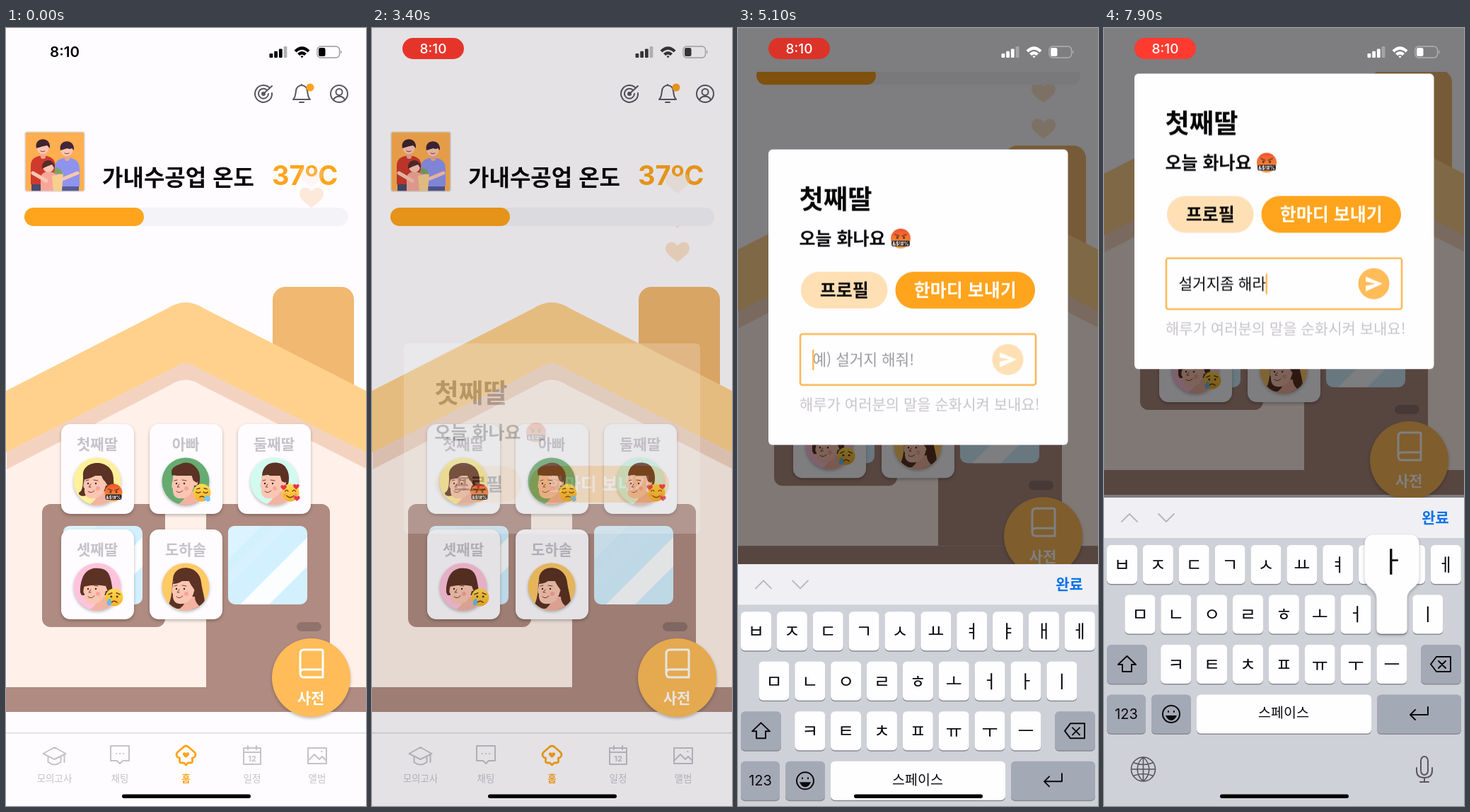
An HTML page for the animation above (8 s loop, 509 by 1100 pixels).

```html
<!DOCTYPE html>
<html lang="ko">
<head>
<meta charset="utf-8">
<style>
html, body { margin: 0; width: 100%; height: 100%; overflow: hidden; background: #fefcff; }
svg { display: block; width: 100vw; height: 100vh; }
text { font-family: "Noto Sans CJK KR", "Noto Sans CJK", "Noto Sans KR", sans-serif; white-space: pre; }
.num { font-family: Inter, Roboto, sans-serif; }
.line { fill: none; stroke-width: 2; stroke-linecap: round; stroke-linejoin: round; }
.card { filter: drop-shadow(0 2px 2px #0004); }

.pill, .clock, .rec, .pilltime, .dim, .modal, .status, .page, .keys, .box, .lead, .entry {
  animation: 8s linear infinite;
}
.pill { animation-name: show-pill; }
.clock { animation-name: hide-clock; }
.rec { animation-name: hide-rec; }
.pilltime { animation-name: show-time; }
.dim { animation-name: dim; }
.modal { animation-name: dim, place; }
.status { animation-name: tint; }
.page { animation-name: scroll; }
.keys { animation-name: raise; }
.box { animation-name: grow; }
.lead { animation-name: nudge; }
.entry { animation-name: reveal; }

@keyframes show-pill { 0%, 3.75% { opacity: 0 } 7.5%, 100% { opacity: 1 } }
@keyframes hide-clock { 0%, 3.75% { opacity: 1 } 7.5%, 100% { opacity: 0 } }
@keyframes hide-rec { 0%, 37.5% { opacity: 1 } 42.5%, 100% { opacity: 0 } }
@keyframes show-time { 0%, 37.5% { opacity: 0 } 42.5%, 100% { opacity: 1 } }
@keyframes dim { 0%, 41.875% { opacity: 0 } 45%, 100% { opacity: 1 } }
@keyframes tint { 0%, 41.875% { color: #000 } 45%, 100% { color: #fff } }
@keyframes place {
  0%, 53.125% { transform: translateY(446px); animation-timing-function: ease-out }
  56.25%, 61.16% { transform: translateY(371.5px); animation-timing-function: cubic-bezier(.5, 1, .89, 1) }
  67.5%, 100% { transform: translateY(64.5px) }
}
@keyframes grow {
  0%, 53.125% { x: 45px; width: 419px; height: 269px; animation-timing-function: ease-out }
  56.25%, 100% { x: 43px; width: 423.5px; height: 418px }
}
@keyframes nudge { 0%, 53.125% { transform: none } 56.25%, 100% { transform: translateX(-2px) } }
@keyframes reveal { 0%, 53.8% { opacity: 0 } 56.25%, 100% { opacity: 1 } }
@keyframes scroll {
  0%, 61.16% { transform: none; animation-timing-function: cubic-bezier(.5, 1, .89, 1) }
  67.5%, 100% { transform: translateY(-307px) }
}
@keyframes raise {
  0%, 61.25% { transform: translateY(436px); animation-timing-function: cubic-bezier(.33, 1, .68, 1) }
  67.5%, 100% { transform: none }
}
</style>
</head>
<body>
<svg id="stage" viewBox="0 0 509 1100" preserveAspectRatio="none"></svg>
<script>
const ORANGE = '#ffa41c', AMBER = '#ffbc58', BROWN = '#b08b81', HAIR = '#5b3224', SKIN = '#fac6b2', GREY = '#c5c2c8', INK = '#5b5660';

const rect = (x, y, w, h, r, fill, more = '') =>
  `<rect x="${x}" y="${y}" width="${w}" height="${h}" rx="${r}" fill="${fill}" ${more}/>`;
const circle = (x, y, r, fill, more = '') => `<circle cx="${x}" cy="${y}" r="${r}" fill="${fill}" ${more}/>`;
const path = (d, fill, more = '') => `<path d="${d}" fill="${fill}" ${more}/>`;
const line = (d, color, more = '') => `<path class="line" d="${d}" stroke="${color}" ${more}/>`;
const at = (x, y, body, more = '') => `<g transform="translate(${x} ${y})" ${more}>${body}</g>`;
// Text placed by its vertical centre
const text = (str, x, cy, size, fill, weight = 400, anchor = 'middle', more = '') =>
  `<text x="${x}" y="${cy + size * .37}" font-size="${size}" fill="${fill}" font-weight="${weight}" text-anchor="${anchor}" ${more}>${str}</text>`;

const HEART = 'M0 14C-3 11-17 3-17-5-17-16-5-17 0-9 5-17 17-16 17-5 17 3 3 11 0 14Z';

function emoji(kind, x, y, r) {
  const eyes = circle(-4, -1, 1.4, '#5a3211') + circle(4, -1, 1.4, '#5a3211');
  const thin = (d, c = '#6b3d10') => line(d, c, 'style="stroke-width:1.3"');
  const small = (hx, hy) => path(HEART, '#f0304a', `transform="translate(${hx} ${hy}) scale(.24)"`);
  const looks = {
    angry: eyes + thin('M-7-5L-2-3M7-5L2-3') + rect(-11, 2.5, 22, 7, 2, '#2b2024')
      + '<text class="num" y="8.2" font-size="6" font-weight="700" fill="#fff" text-anchor="middle">&amp;$!#%</text>',
    sleepy: thin('M-8-1Q-5 2-2-1M2-1Q5 2 8-1M-7-5L-3-6M7-5L3-6M-3 6Q0 4 3 6')
      + path('M5 5C8 2 12 5 11 8 13 11 8 14 6 11 2 11 2 7 5 5Z', '#7cc8f5'),
    loved: thin('M-7-2Q-5-5-3-2M3-2Q5-5 7-2M-5 4Q0 9 5 4') + circle(-7, 3, 2, '#ff9a6b') + circle(7, 3, 2, '#ff9a6b')
      + small(-9, -7) + small(8, -8) + small(9, 8),
    sad: eyes + thin('M-8-4L-3-6M8-4L3-6M-4 7Q0 3 4 7') + path('M-6 1C-2 6-4 11-7 11-11 11-11 6-6 1Z', '#62bdf5')
  };
  return `<g transform="translate(${x} ${y}) scale(${r / 12})">`
    + circle(0, 0, 12, kind === 'angry' ? 'url(#rage)' : 'url(#glad)') + looks[kind] + '</g>';
}

const BACK = {
  bob: 'M-20-8C-22-32 24-34 23-2 23 8 30 20 22 24L-16 20C-20 22-27 20-26 16-20 14-20 2-20-8Z',
  bun: 'M18-30a8.500 8.500 0 1 1 .1 0ZM-12-14C-8-30 22-30 21-4 21 8 15 12 10 10Z',
  short: 'M-18-10C-20-28 18-32 20-8 21 2 18 9 14 10L8 0Z',
  fringe: 'M-24 8C-26-32 17-34 20-6 22 4 22 8 19 12L-22 12Z',
  long: 'M-18-10C-18-34 20-32 22-6 24 10 32 26 22 33L-27 30C-18 18-20 0-18-10Z'
};
const FRONT = {
  bob: 'M-20-2C-20-20-8-27 2-25 20-25 22-8 17 10L11 0C6-4 6-10 4-14-2-6-12-4-20-2Z',
  bun: 'M-17-8C-16-24-4-28 6-26 20-24 22-8 16 2L11 0C9-6 9-8 7-13 0-9-10-9-17-8Z',
  short: 'M-19-8C-24-22-8-23-4-26 14-30 22-12 16 2L11-1C9-6 9-8 7-13 0-8-10-12-19-8Z',
  fringe: 'M-23 1C-23-22-8-28 2-26 20-26 22-6 17 12L12-1C0-3-10-3-23 1Z',
  long: 'M-18-4C-16-22-6-28 4-26 22-24 24-2 18 18L11 2C6-4 4-10 2-14-4-8-10-4-18-4Z'
};
const avatar = (x, y, bg, style) => at(x, y, circle(0, 0, 33.5, bg, 'class="card"') + '<g clip-path="url(#disc)">'
  + path(BACK[style], HAIR)
  + path('M0 14H13C13 24 20 27 27 34H-14C-6 30 0 26 0 14Z', '#f3b3a1')
  + path('M-18-8C-17 0-22 7-18 10-19 22-12 25-5 24 6 24 14 12 13-8Z', SKIN)
  + circle(13, 2, 4, SKIN) + path(FRONT[style], HAIR)
  + circle(-13, 3, 1.2, '#3a211b') + circle(-2, 3, 1.2, '#3a211b') + circle(1, 10, 3, '#f7a599')
  + line('M-16-1L-12-2M-5-2L1-1M-13 14Q-9 18-4 13M-9 4L-12 8H-9', '#7a3a30', 'style="stroke-width:1"') + '</g>');

const card = (x, y, name, bg, style, mood, dx = 23, dy = 16) =>
  rect(x, y, 103, 127, 13, '#fefcff', 'class="card"') + text(name, x + 51, y + 28, 21, GREY, 700)
  + avatar(x + 51, y + 81, bg, style) + (mood ? emoji(mood, x + 51 + dx, y + 81 + dy, 12.5) : '');

const glass = x => at(x, 704, rect(0, 0, 112, 111, 10, '#d3f0ff')
  + path('M0 48 48 0H10Q0 0 0 10Z', '#dcf4ff') + path('M17 111 112 16V57L58 111Z', '#fbfdff')
  + path('M0 84 84 0H66L0 66Z', '#dcf4ff', 'opacity=".5"'));

const house = rect(377, 366, 115, 210, 18, '#f0b870')
  + path('M1 620 254 480 509 620V932H1Z', '#fff1e9')
  + path('M1 560 254 440 509 560V623L276 505Q254 490 232 505L1 624Z', '#f3d3c0')
  + path('M0 513 229 396Q254 380 279 396L509 513V600L272 481Q254 467 236 481L0 600Z', '#ffd18d')
  + rect(51, 673, 174, 174, 12, BROWN) + path('M283 932V685a12 12 0 0 1 12-12H446a12 12 0 0 1 12 12V932Z', BROWN)
  + glass(81) + glass(314) + rect(411, 840, 35, 13, 6.5, '#8f736c') + rect(0, 932, 509, 35.5, 0, BROWN);

const cards = card(78, 560, '첫째딸', '#fff09a', 'bob', 'angry') + card(203, 560, '아빠', '#66ab70', 'short', 'sleepy')
  + card(328, 560, '둘째딸', '#d2fbef', 'bun', 'loved') + card(78, 709, '셋째딸', '#ffc3dc', 'fringe', 'sad', 24, 15)
  + card(203, 709, '도하솔', '#ffca66', 'long');

const person = (x, y, shirt, hair) => at(x, y, path('M-17 52V26Q-17 14-5 12H6Q17 14 18 26V52Z', shirt)
  + rect(-3, 6, 7, 10, 3, '#f0a592') + circle(0, 1, 8.5, SKIN) + path('M-9 1C-13-15 12-17 10 1L6-3Q0-2-9 1Z', hair)
  + line('M-3 5Q0 7 3 5', '#8a3b30', 'style="stroke-width:1"'));
const family = at(27, 147, '<g clip-path="url(#photo)">' + rect(0, 0, 84, 84, 3, '#ffae50')
  + person(25, 22, '#cf3a2c', '#3f2530') + person(59, 25, '#8d93ee', '#43263a') + circle(63, 20, 4, '#43263a')
  + path('M9 74H44V84H9Z', '#4a4a6a') + path('M46 77H76V84H46Z', '#575a96')
  + path('M22 84V64Q24 56 33 56 44 56 46 66V84Z', '#f7a79a') + circle(33, 49, 8, SKIN)
  + path('M24 52C22 36 43 36 42 52L38 46Q32 48 24 52Z', '#552b2b')
  + path('M38 62 54 58 52 84H40Z', '#f8cf8c') + path('M40 58 44 50 50 53 54 60Z', '#7fa35b')
  + line('M11 58 30 69M74 58 52 67', SKIN, 'style="stroke-width:5"') + '</g>'
  + rect(0, 0, 84, 84, 3, 'none', 'stroke="#ddd9dc" stroke-width="1.5"'));

const header = at(364, 93, line('M9-8A12 12 0 1 0 12-1M4-6A7 7 0 1 0 7 0M0 0 12-11M0-2A2 2 0 1 0 2 0', INK))
  + at(418, 93, line('M-12 8C-8 4-9 0-8-4A8 8 0 0 1 8-4C9 0 8 4 12 8ZM-3 12H3M0-12V-13', INK)) + circle(430, 84, 5.5, ORANGE)
  + at(471, 93, line('M-12 0a12 12 0 1 0 24 0a12 12 0 1 0-24 0M-4.5-2.5a4.5 4.5 0 1 0 9 0a4.5 4.5 0 1 0-9 0M-8 9C-6 2 6 2 8 9', INK))
  + family + text('가내수공업 온도', 136, 211, 32, '#0b090b', 700, 'start')
  + '<text class="num" x="376" y="222" font-size="38" font-weight="700" fill="#ffa41c">37ºC</text>';

const fab = circle(431.5, 918.5, 55.5, AMBER, 'class="card"')
  + line('M421 879H446Q448 879 448 881V918H421Q416 918 416 912V885Q416 879 421 879ZM416 912Q416 907 421 907H448', '#fff', 'style="stroke-width:3"')
  + text('사전', 431, 947, 21, '#fff', 700);

const tab = (x, name, icon, color = GREY, weight = 400, stroke = 2) =>
  at(x, 1028, line(icon, color, `style="stroke-width:${stroke}"`)) + text(name, x, 1061, 13.5, color, weight);
const nav = rect(0, 967, 509, 440, 0, '#fefcff') + rect(0, 996, 509, 1.5, 0, '#dcdadf')
  + tab(68.5, '모의고사', 'M-16-2 0-11 16-2 0 6ZM-9 3V10Q0 17 9 10V3M14 0V10')
  + tab(161, '채팅', 'M-13-13H13V8H4L0 12-4 8H-13ZM-5-2H-4.8M0-2H.2M5-2H5.2')
  + tab(254.5, '홈', 'M0-13Q2-13 4-11L12-4Q15-1 12 3L9 4V9Q9 11 6 11H3L0 14-3 11H-6Q-9 11-9 9V4L-12 3Q-15-1-12-4L-4-11Q-2-13 0-13Z', ORANGE, 700, 2.8)
  + path(HEART, ORANGE, 'transform="translate(254.5 1028) scale(.27)"')
  + tab(348, '일정', 'M-12-10H12V13H-12ZM-12-4H12M-6-13V-8M6-13V-8')
  + `<text class="num" x="348" y="1037" font-size="11" font-weight="700" fill="${GREY}" text-anchor="middle">12</text>`
  + tab(440, '앨범', 'M-13-10H13V12H-13ZM-13 8-4-1 3 6 7 2 13 8M6-5H6.5');

const button = (x, w, label, fill, color) => rect(x, 173, w, 52, 26, fill) + text(label, x + w / 2, 199, 25, color, 700);
const modal = '<rect class="box" y="0" rx="6" fill="#fefdff"/>'
  + `<g class="lead">${text('첫째딸', 88.5, 70, 37.3, '#080708', 700, 'start')}${text('오늘 화나요', 88.5, 126, 25, '#080708', 700, 'start')}${emoji('angry', 232, 126, 14)}</g>`
  + button(89, 122.5, '프로필', '#ffe0b5', '#080708') + button(222.5, 197.5, '한마디 보내기', ORANGE, '#fff')
  + '<g class="entry">' + rect(88, 261, 333, 72, 3, '#fefdff', 'stroke="#fdb851" stroke-width="2.5"')
  + text('예) 설거지 해줘!', 105.5, 297, 21.3, '#9c9a9e', 400, 'start', 'id="hint"')
  + text('', 105.5, 297, 21.3, '#0b0a0b', 400, 'start', 'id="typed"')
  + rect(105, 283, 2.5, 29, 0, AMBER, 'id="caret"') + circle(381.5, 297, 22, AMBER, 'id="send"')
  + path('M370 287 394 297 370 308V300L384 297 370 294Z', '#fff')
  + text('해루가 여러분의 말을 순화시켜 보내요!', 87, 360, 21, '#c8c5cb', 400, 'start') + '</g>';

const keyPos = {};
const key = (x, y, w, fill = '#fefdff', id = '') => rect(x, y + 1.5, w, 55, 6, '#898b91') + rect(x, y, w, 55, 6, fill, id);
const row = (letters, x0, y) => [...letters].map((c, i) => {
  const x = x0 + i * 50.87;
  keyPos[c] = [x, y];
  return key(x, y, 43) + text(c, x + 21.5, y + 27.5, 25, '#0a0a0c');
}).join('');
const DARK = '#a4a9b6';
const keyboard = rect(0, 664, 509, 57, 0, '#f0eff4') + rect(0, 721, 509, 820, 0, '#cfd1d8')
  + line('M25 698 36 687 47 698M77 687 88 698 99 687', '#b8b8bf') + text('완료', 468.5, 692, 21, '#0a73e8', 700)
  + row('ㅂㅈㄷㄱㅅㅛㅕㅑㅐㅔ', 4, 731) + row('ㅁㄴㅇㄹㅎㅗㅓㅏㅣ', 29.4, 801.5) + row('ㅋㅌㅊㅍㅠㅜㅡ', 80.2, 872)
  + key(4, 872, 57, DARK) + key(448, 872, 57, DARK) + key(4, 942.5, 55, DARK) + key(67, 942.5, 56, DARK)
  + key(131, 942.5, 247, '#fefdff', 'id="space"') + key(386, 942.5, 119, DARK)
  + text('스페이스', 254, 968, 19.5, '#0a0a0c')
  + '<text class="num" x="31.5" y="977" font-size="20" fill="#0a0a0c" text-anchor="middle">123</text>'
  + line('M32.500 888 45 900H39V910H26V900H20ZM470 889H490V910H470L462 899.500ZM473 895 483 905M483 895 473 905M458 960V971H433M440 964 433 971 440 978', '#0a0a0c')
  + at(95, 970, line('M-12 0a12 12 0 1 0 24 0a12 12 0 1 0-24 0M-4-4V-3M4-4V-3', '#0a0a0c') + path('M-8 2H8Q5 9 0 9-5 9-8 2Z', '#0a0a0c'))
  + at(55.5, 1048, line('M-17 0a17 17 0 1 0 34 0a17 17 0 1 0-34 0M-17 0H17M0-17V17M0-17C-11-8-11 8 0 17M0-17C11-8 11 8 0 17M-13-9Q0-4 13-9M-13 9Q0 4 13 9', INK, 'style="stroke-width:1.6"'))
  + at(453, 1048, line('M-5-12a5 6 0 0 1 10 0V2a5 6 0 0 1-10 0ZM-11-2V2Q-11 12 0 12 11 12 11 2V-2M0 12V18M-6 18H6', INK))
  + '<g id="pop">' + path('M-5-85H48a12 12 0 0 1 12 12V-24C60-10 43-10 43 6V49a6 6 0 0 1-6 6H6a6 6 0 0 1-6-6V6C0-10-17-10-17-24V-73a12 12 0 0 1 12-12Z', '#fefdff', 'class="card"')
  + text('', 21.5, -47, 40, '#0a0a0c') + '</g>';

const status = [0, 1, 2, 3].map(i => rect(372.5 + i * 6.7, 36 - i * 3.3, 4.8, 6 + i * 3.3, 1.2, 'currentColor', i > 2 ? 'opacity=".3"' : '')).join('')
  + path('M407.500 31.500Q418.500 21 429.500 31.500L426.500 34.500Q418.500 27 410.500 34.500ZM412 36Q418.500 30 425 36L422 39Q418.500 36 415 39ZM416.500 40Q418.500 38.500 420.500 40L418.500 42.500Z', 'currentColor')
  + rect(440, 26, 31.5, 16, 5, 'none', 'stroke="currentColor" stroke-opacity=".4" stroke-width="1.4"')
  + rect(442, 28, 9.5, 12, 2.5, 'currentColor') + path('M473 31.500Q476 34 473 36.500Z', 'currentColor', 'opacity=".45"');

const clock = (x, y, size, weight, fill, cls) =>
  `<g class="${cls}"><text class="num" x="${x}" y="${y}" font-size="${size}" font-weight="${weight}" fill="${fill}" text-anchor="middle">8:10</text></g>`;

const stage = document.getElementById('stage');
stage.innerHTML = `<defs>
  <clipPath id="disc"><circle r="33.5"/></clipPath>
  <clipPath id="photo"><rect width="84" height="84" rx="3"/></clipPath>
  <clipPath id="safe"><rect y="62" width="509" height="1038"/></clipPath>
  <linearGradient id="rage" x2="0" y2="1"><stop stop-color="#f0522e"/><stop offset="1" stop-color="#f9a13f"/></linearGradient>
  <linearGradient id="glad" x2="0" y2="1"><stop stop-color="#ffdc50"/><stop offset="1" stop-color="#f8b02c"/></linearGradient>
</defs>
${rect(0, 0, 509, 1100, 0, '#fefcff')}
<g clip-path="url(#safe)"><g class="page">${header}
  ${[0, 1, 2].map(() => path(HEART, '#fbe2cb', 'class="heart"')).join('')}
  ${rect(26, 254, 458, 26, 13, '#f4f3f7')}${rect(26, 254, 169, 26, 13, ORANGE)}
  ${house}${cards}${nav}${fab}</g></g>
<rect class="dim" width="509" height="1100" fill="#000" fill-opacity=".5"/>
<g class="modal">${modal}</g>
<g class="keys">${keyboard}</g>
<g class="status">${status}</g>
${clock(83, 41, 20.5, 600, '#000', 'clock')}
<g class="pill">${rect(43, 14, 87, 30, 15, '#ff3b30', 'id="lamp"')}
  <g class="rec">${circle(86.5, 29, 9, 'none', 'stroke="#fff" stroke-width="2"')}${circle(86.5, 29, 4.2, '#fff')}</g>
  ${clock(86.5, 36, 19, 500, '#fff', 'pilltime')}</g>
${rect(164, 1083.5, 182, 5.5, 2.75, '#000')}`;

const $ = id => document.getElementById(id);
const hint = $('hint'), typed = $('typed'), caret = $('caret'), send = $('send'), pop = $('pop'), space = $('space'), lamp = $('lamp');
const popLabel = pop.querySelector('text');
const hearts = [...stage.querySelectorAll('.heart')];

const LOOP = 8000, FIRST_KEY = 5847, KEY_GAP = 141, COMMIT = 70, HOLD = 112;
const presses = [...'ㅅㅓㄹㄱㅓㅈㅣㅈㅗㅁ ㅎㅐㄹㅏ'];
const words = ['', 'ㅅ', '서', '설', '섥', '설거', '설겆', '설거지', '설거짖', '설거지조', '설거지좀',
  '설거지좀 ', '설거지좀 ㅎ', '설거지좀 해', '설거지좀 핼', '설거지좀 해라'];

const clamp = (v, lo, hi) => Math.min(hi, Math.max(lo, v));
function track(points, t) {
  let i = 1;
  while (i < points.length - 1 && t > points[i][0]) i++;
  const [t0, a] = points[i - 1], [t1, b] = points[i];
  return a + (b - a) * clamp((t - t0) / (t1 - t0), 0, 1);
}

// Three hearts leave the chimney, close up and fade near the top
const RISE = [[300, 490], [1270, 341], [1700, 292], [1900, 244], [2220, 180]];
const SPREAD = [[1270, 51], [1700, 46], [1900, 29]];
function drawHearts(t) {
  const phase = (t + 1620) % 1920 + 300;
  hearts.forEach((h, i) => {
    const y = track(RISE, phase) - i * track(SPREAD, phase);
    h.setAttribute('transform', `translate(432 ${y})`);
    h.setAttribute('opacity', clamp((y - 198) / 60, 0, 1));
  });
}

function drawTyping(t) {
  const n = clamp(Math.floor((t - FIRST_KEY - COMMIT) / KEY_GAP) + 1, 0, presses.length);
  const word = words[n];
  if (typed.textContent !== word) typed.textContent = word;
  hint.setAttribute('opacity', word ? 0 : 1);
  send.setAttribute('fill', word ? AMBER : '#ffe0b5');
  caret.setAttribute('x', 105 + (word ? typed.getComputedTextLength() : 0));
  caret.setAttribute('opacity', t >= 4900 ? 1 : 0);

  const i = Math.floor((t - FIRST_KEY) / KEY_GAP);
  const held = t - FIRST_KEY - i * KEY_GAP < HOLD ? presses[i] : undefined;
  const spot = keyPos[held];
  space.setAttribute('fill', held === ' ' ? DARK : '#fefdff');
  pop.setAttribute('visibility', spot ? 'visible' : 'hidden');
  if (spot) {
    pop.setAttribute('transform', `translate(${spot})`);
    popLabel.textContent = held;
  }
}

let start;
function tick(now) {
  start ??= now;
  const t = (now - start) % LOOP;
  drawHearts(t);
  drawTyping(t);
  const dark = clamp(Math.cos((t - 3200) / 1900 * 2 * Math.PI) - .2, 0, 1);
  lamp.style.filter = `brightness(${1 - dark * .17})`;
  requestAnimationFrame(tick);
}
requestAnimationFrame(tick);
</script>
</body>
</html>
```
